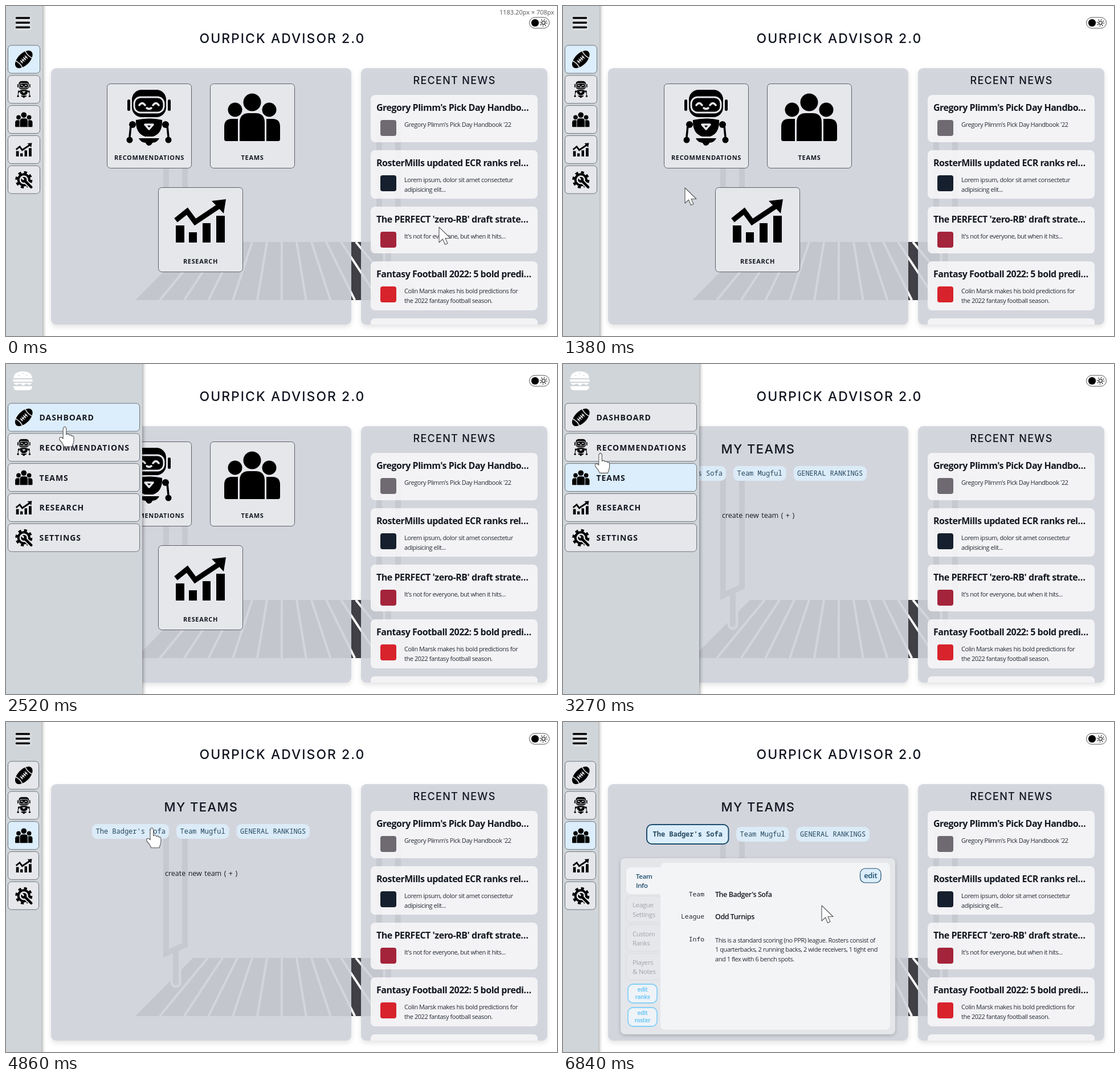
These frames come from a looping animation (967x579 px, 6.87 s). An HTML page:

```html
<!DOCTYPE html>
<html lang="en">
<head>
<meta charset="utf-8">
<style>
html, body { margin: 0; width: 100%; height: 100%; overflow: hidden; background: #fff; }
#stage { display: block; }
text { font-family: "Open Sans", "Noto Sans", sans-serif; fill: #141821; }
.title { font-family: Inter, sans-serif; font-weight: 500; text-anchor: middle; fill: #111520; }
.head { font-size: 16px; font-weight: 700; letter-spacing: -.48px; }
.body { font-size: 11px; letter-spacing: -.44px; fill: #262b36; }
.label { font-size: 11px; font-weight: 700; letter-spacing: .65px; text-anchor: middle; }
.menu { font-size: 14px; font-weight: 700; letter-spacing: .95px; }
.mono { font-family: "Noto Sans Mono", "DejaVu Sans Mono", monospace; font-size: 12px; fill: #264962; }
.key { font-size: 11.4px; fill: #20242e; text-anchor: end; }
.value { font-size: 12.5px; font-weight: 600; letter-spacing: -.45px; }
.tab { font-size: 11.5px; letter-spacing: -.35px; fill: #a0a4ac; }
.on { fill: #1d4c6d; font-weight: 600; }
.mini { font-size: 9.8px; font-weight: 700; letter-spacing: -.3px; fill: #72caf6; text-anchor: middle; }
.panel { fill: rgba(209,212,220,.915); filter: drop-shadow(0 4px 4px rgba(0,0,0,.12)); }
.sheet { fill: #e4e6ea; filter: drop-shadow(0 2px 3px rgba(0,0,0,.2)); }
.card { fill: #e6e7eb; stroke: #5c6066; }
.item { fill: #e6e7eb; stroke: #6c737c; }
.item.active { fill: #dceefb; }
.news { fill: rgba(248,249,250,.86); }
.chip { fill: #dbebf7; }
.chosen { fill: #dceefb; stroke: #1d4c6d; stroke-width: 2; }
.line { fill: none; stroke: #000; }
.white { fill: none; stroke: #e6e7eb; stroke-linecap: round; }
#bar { fill: #d0d5d9; filter: drop-shadow(1px 0 3px rgba(0,0,0,.45)); }
#cursor path { fill: #fff; stroke: #555; stroke-width: 1.1; stroke-linejoin: round; }
</style>
</head>
<body>
<svg id="stage" width="967" height="579" viewBox="0 0 967 579"></svg>
<script>
const LOOP = 6870, OPEN = 2100, TEAMS = 3150, CLOSE = 3480, DETAIL = 4890;
const $ = id => document.getElementById(id);
const text = (cls, x, y, s, extra = '') => `<text class="${cls}" x="${x}" y="${y}" ${extra}>${s}</text>`;
const rect = (cls, x, y, w, h, r = 0, extra = '') =>
  `<rect class="${cls}" x="${x}" y="${y}" width="${w}" height="${h}" rx="${r}" ${extra}/>`;
const title = (x, y, size, gap, s) => text('title', x, y, s, `font-size="${size}" letter-spacing="${gap}"`);
const use = (id, x, y, scale = 1) => `<use href="#${id}" transform="translate(${x} ${y}) scale(${scale})"/>`;
const range = (n, f) => Array.from({length: n}, (_, i) => f(i)).join('');

const icons = `<defs>
<g id="ball" transform="rotate(-45)">
  <path d="M-20 0C-20 -7 -9 -11 0 -11S20 -7 20 0S9 11 0 11S-20 7 -20 0"/>
  <path class="white" stroke-width="1.6" d="M-13 -10Q-9 0 -13 10M13 -10Q9 0 13 10M-7 0H7${range(4, i => `M${i * 4 - 6} -3V3`)}"/>
</g>
<g id="robot">
  <rect x="-30" y="-49" width="60" height="48" rx="17"/>
  <rect x="-38" y="-32" width="5" height="20" rx="2.5"/><rect x="33" y="-32" width="5" height="20" rx="2.5"/>
  <rect class="white" x="-26" y="-36" width="52" height="27" rx="11" stroke-width="3"/>
  <path class="white" stroke-width="3.5" d="M-17 -22Q-12 -29 -7 -22M7 -22Q12 -29 17 -22M-4 -17Q0 -14 4 -17"/>
  <path d="M-23 4Q0 -1 23 4Q24 28 7 33H-7Q-24 28 -23 4"/>
  <path class="white" stroke-width="3.5" stroke-linejoin="round" d="M-7 12H7L0 20Z"/>
  <circle cx="-29" cy="12" r="6"/><circle cx="29" cy="12" r="6"/>
  <path class="line" stroke-width="3.5" d="M-32 14L-34 34M32 14L34 34"/>
  <circle cx="-34" cy="39" r="5.5"/><circle cx="34" cy="39" r="5.5"/>
  <path d="M-18 36H18Q15 43 6 44Q4 49 0 49Q-4 49 -6 44Q-15 43 -18 36"/>
</g>
<g id="people">
  <circle cy="-26" r="15.5"/><circle cx="-30" cy="-13" r="12.5"/><circle cx="30" cy="-13" r="12.5"/>
  <path d="M-22 42V10Q-22 -7 -6 -7H6Q22 -7 22 10V42Z"/>
  <path id="side" d="M-25 42H-46Q-49 42 -49 38V17Q-49 3 -36 3H-25Z"/><use href="#side" transform="scale(-1 1)"/>
</g>
<g id="chart">
  <path d="M-43 8H-28V38H-43ZM-20 20H-6V38H-20ZM4 4H18V38H4ZM28 -9H43V38H28Z"/>
  <path class="line" stroke-width="9" d="M-43 -1L-23 -17L-9 2L36 -28"/>
  <path d="M20 -35L45 -38L41 -13Z"/>
</g>
<g id="gear">
  <circle class="line" r="9.6" stroke-width="4"/>
  <circle class="line" r="12.8" stroke-width="4.5" stroke-dasharray="5 5.05"/>
  <path class="white" stroke-width="8" d="M2 2L12 12"/>
  <path class="line" stroke-width="4.5" stroke-linecap="round" d="M0 0L13 13"/>
  <circle r="5"/><path class="white" stroke-width="3" d="M-1 -1L-4 -4"/>
</g></defs>`;

// Striped field and goal posts behind the panels
const field = `<path fill="#414147" d="M328 414H640L741 516H227Z"/>
  <path stroke="#fff" stroke-width="4" d="${range(11, i => `M${354 + i * 26} 414L${269.8 + i * 42.8} 516`)}"/>
  <g id="post" fill="none" stroke="#666">
  <path stroke-width="19" stroke="#fff" stroke-linecap="round" d="M298 409V457"/>
  <path stroke-width="10" stroke-linecap="round" d="M298 404V457"/>
  <path stroke-width="10" d="M281 190V406L314 391V190"/></g>
  <use href="#post" transform="translate(969) scale(-1 1)"/>`;

const newsCards = [
  [156, 83, '#6f6a72', "Gregory Plimm's Pick Day Handbo…", "Gregory Plimm's Pick Day Handbook '22"],
  [253, 85, '#151f2d', 'RosterMills updated ECR ranks rel…', 'Lorem ipsum, dolor sit amet consectetur', 'adipisicing elit...'],
  [352, 82, '#a4243b', "The PERFECT 'zero-RB' draft strate…", "It's not for everyone, but when it hits..."],
  [448, 86, '#d8232c', 'Fantasy Football 2022: 5 bold predi…', 'Colin Marsk makes his bold predictions for', 'the 2022 fantasy football season.'],
].map(([y, h, color, head, ...lines]) => rect('news', 640, y, 293, h, 8)
  + text('head', 650, y + 28, head)
  + rect('', 657, y + 44, 28, 28, 4, `fill="${color}"`)
  + lines.map((s, i) => text('body', 699, y + 56 + i * 16.5, s)).join('')).join('');

const card = (x, y, icon, label, dy) => rect('card', x + .5, y + .5, 148, 148, 6)
  + use(icon, x + 74, y + dy) + text('label', x + 74.5, y + 134, label);
const dashboard = card(177, 136, 'robot', 'RECOMMENDATIONS', 60)
  + card(358, 136, 'people', 'TEAMS', 59) + card(267, 318, 'chart', 'RESEARCH', 59);

const chip = (x, y, w, s) => rect('chip', x, y, w, 26, 9) + text('mono', x + 6.5, y + 17, s);
const teamList = chip(151, 179, 135, "The Badger's Sofa") + chip(299, 179, 92.5, 'Team Mugful')
  + chip(404.5, 179, 128.5, 'GENERAL RANKINGS')
  + text('', 279, 269.5, 'create new team ( + )', 'font-size="12.5" word-spacing="1.2"');

const tabs = [['Team', 'Info'], ['League', 'Settings'], ['Custom', 'Ranks'], ['Players', '&amp; Notes']]
  .map((lines, i) => {
    const y = 255 + i * 50.3;
    return (i ? rect('', 111, y, 62, 46.5, 8, 'fill="#e6e7ea" stroke="#d9dbdf"') : rect('', 111, y, 70, 47, 8, 'fill="#f3f4f6"'))
      + lines.map((s, k) => text(i ? 'tab' : 'tab on', i ? 122 : 128, y + 20 + k * 16.3, s)).join('');
  }).join('');
const miniButton = (y, s) => rect('', 114, y, 51, 33, 9, 'fill="#eef3f8" stroke="#85d0f7" stroke-width="1.8"')
  + text('mini', 139.5, y + 13, 'edit') + text('mini', 139.5, y + 26, s);
const detail = rect('chosen', 147, 180, 143.5, 34, 9)
  + text('mono', 157.5, 201, "The Badger's Sofa", 'font-weight="700"')
  + chip(304, 184, 92.5, 'Team Mugful') + chip(409.5, 184, 128.5, 'GENERAL RANKINGS')
  + rect('sheet', 101, 239, 482, 309, 8) + tabs + miniButton(460, 'ranks') + miniButton(501, 'roster')
  + rect('', 171, 247, 403, 293, 8, 'fill="#f3f4f6"')
  + rect('chosen', 521.5, 257, 36.5, 25, 9, 'style="stroke-width:1.2"')
  + text('on', 539.7, 274, 'edit', 'font-size="13" letter-spacing="-.3" text-anchor="middle"')
  + ['Team', 'League', 'Info'].map((s, i) => text('mono key', 248, 306 + i * 39.3, s)).join('')
  + text('value', 267, 307, "The Badger's Sofa") + text('value', 267, 346, 'Odd Turnips')
  + ['This is a standard scoring (no PPR) league. Rosters consist of',
     '1 quarterbacks, 2 running backs, 2 wide receivers, 1 tight end',
     'and 1 flex with 6 bench spots.'].map((s, i) => text('body', 267, 386.5 + i * 16.5, s)).join('');

const menu = [['ball', 'DASHBOARD', .95], ['robot', 'RECOMMENDATIONS', .3], ['people', 'TEAMS', .31],
  ['chart', 'RESEARCH', .315], ['gear', 'SETTINGS', 1]];
const itemY = i => 69 + i * 52.8;
const sidebar = `<rect id="bar" x="-10" y="-10" height="600"/>
  <g id="closedIcon"><path class="line" stroke-width="3.6" stroke-linecap="round"
    style="filter:drop-shadow(1px 1px 2px #fff)" d="M18.5 21H40.5M18.5 29.2H40.5M18.5 37.5H40.5"/></g>
  <g id="openIcon" fill="#fff"><path d="M13 25Q14 13 29.5 13Q45 13 46 25Z"/><rect x="12" y="27" width="35" height="4" rx="2"/>
    <path d="M13 33H46L41 37L36 34L30 38L24 34L18 37Z"/><path d="M13 39H46Q46 46 40 46H19Q13 46 13 39"/>
    <path stroke="#d0d5d9" stroke-width="1.6" stroke-linecap="round" d="M22 20h1M29 17h1M36 20h1"/></g>`
  + menu.map((m, i) => rect('item', 3.5, itemY(i), 50, 49, 6)).join('')
  + `<svg id="labels" height="579">${menu.map(([icon, label, scale], i) =>
      use(icon, 31.3, itemY(i) + 24.7, scale) + text('menu', 58.5, itemY(i) + 30, label)).join('')}</svg>`;

const toggle = rect('', 918.5, 20, 35, 19, 9.5, 'fill="#fff" stroke="#555"') + `<circle cx="928.5" cy="29.5" r="6.6"/>
  <g transform="translate(943.3 29.5)"><circle class="line" r="3" stroke-width="1.1"/>
  <circle class="line" r="5.7" stroke-width="1.8" stroke-dasharray="1.2 3.276"/></g>`;

$('stage').innerHTML = icons + field + toggle
  + text('', 866, 15, '1183.20px × 708px', 'id="size" font-size="11" style="fill:#555"')
  + title(485, 65, 23, 2, 'OURPICK ADVISOR 2.0')
  + rect('panel', 79, 109, 527, 450, 9) + rect('panel', 623, 109, 327, 450, 9)
  + title(787, 137, 18, 1.3, 'RECENT NEWS') + newsCards
  + '<path class="news" d="M640 559V556Q640 548 648 548H925Q933 548 933 556V559Z"/>'
  + `<g id="dashboard">${dashboard}</g><g id="teams">${title(342.5, 157, 22, 1.4, 'MY TEAMS')}
     <g id="list">${teamList}</g><g id="detail">${detail}</g></g>` + sidebar
  + `<g id="cursor"><path id="arrow" d="M0 0V27L6.5 21L10.5 30.5L15 28.5L11 19.5H20Z"/>
     <path id="hand" d="M-2.8 3Q0 -3 2.8 3V14Q6 11 8 15Q11 13 12.5 16.5Q16 15 16 19V25Q15 30 13 35H-1Q-4 28 -9 23Q-10 17 -5 19L-2.8 21Z"/></g>`;

const path = [[0, 760, 388], [30, 760, 388], [510, 500, 372], [660, 490, 370], [1230, 216, 320], [1380, 214, 319],
  [1950, 30, 28], [2160, 30, 28], [2520, 103, 110], [2760, 98, 140], [3060, 78, 200], [3180, 78, 200],
  [3450, 31, 35], [3520, 31, 35], [3720, 157, 54], [4140, 235, 120], [4650, 255, 184], [4920, 256, 186],
  [5130, 260, 192], [5670, 413, 291], [5880, 414, 292], [6330, 440, 310], [6480, 440, 310], [6840, 454, 322], [LOOP, 454, 322]];
const ease = (t, from, span) => {
  const p = Math.min(1, Math.max(0, (t - from) / span));
  return p * p * (3 - 2 * p);
};
const inside = (x, y, l, t, w, h) => x >= l && x <= l + w && y >= t && y <= t + h;
const show = (id, on) => $(id).style.display = on ? '' : 'none';
const items = document.querySelectorAll('.item');

function draw(t) {
  const onTeams = t >= TEAMS, onDetail = t >= DETAIL;
  const k = path.findIndex(p => p[0] > t), [t0, x0, y0] = path[k - 1], [t1, x1, y1] = path[k];
  const p = ease(t, t0, t1 - t0), x = x0 + (x1 - x0) * p, y = y0 + (y1 - y0) * p;
  const edge = t < CLOSE ? 64 + 175 * ease(t, OPEN, 300) : 239 - 177 * ease(t, CLOSE, 210);

  show('size', t < 300);
  show('dashboard', !onTeams);
  show('teams', onTeams);
  show('list', !onDetail);
  show('detail', onDetail);
  const open = t >= OPEN && t < CLOSE;
  show('openIcon', open);
  show('closedIcon', !open);
  $('bar').setAttribute('width', edge + 10);
  $('labels').setAttribute('width', edge - 6);
  items.forEach((el, i) => {
    el.setAttribute('width', edge - 8);
    el.classList.toggle('active', i === (onTeams ? 2 : 0));
  });

  const hand = inside(x, y, 12, 14, 36, 34) || inside(x, y, 0, 69, edge - 5, 261)
    || (onTeams ? inside(x, y, 151, 179, 135, 30)
                : inside(x, y, 267, 318, 149, 149));
  show('hand', hand);
  show('arrow', !hand);
  $('cursor').setAttribute('transform', `translate(${x} ${y})`);
}

function tick() {
  draw(performance.now() % LOOP);
  requestAnimationFrame(tick);
}
tick();
</script>
</body>
</html>
```
